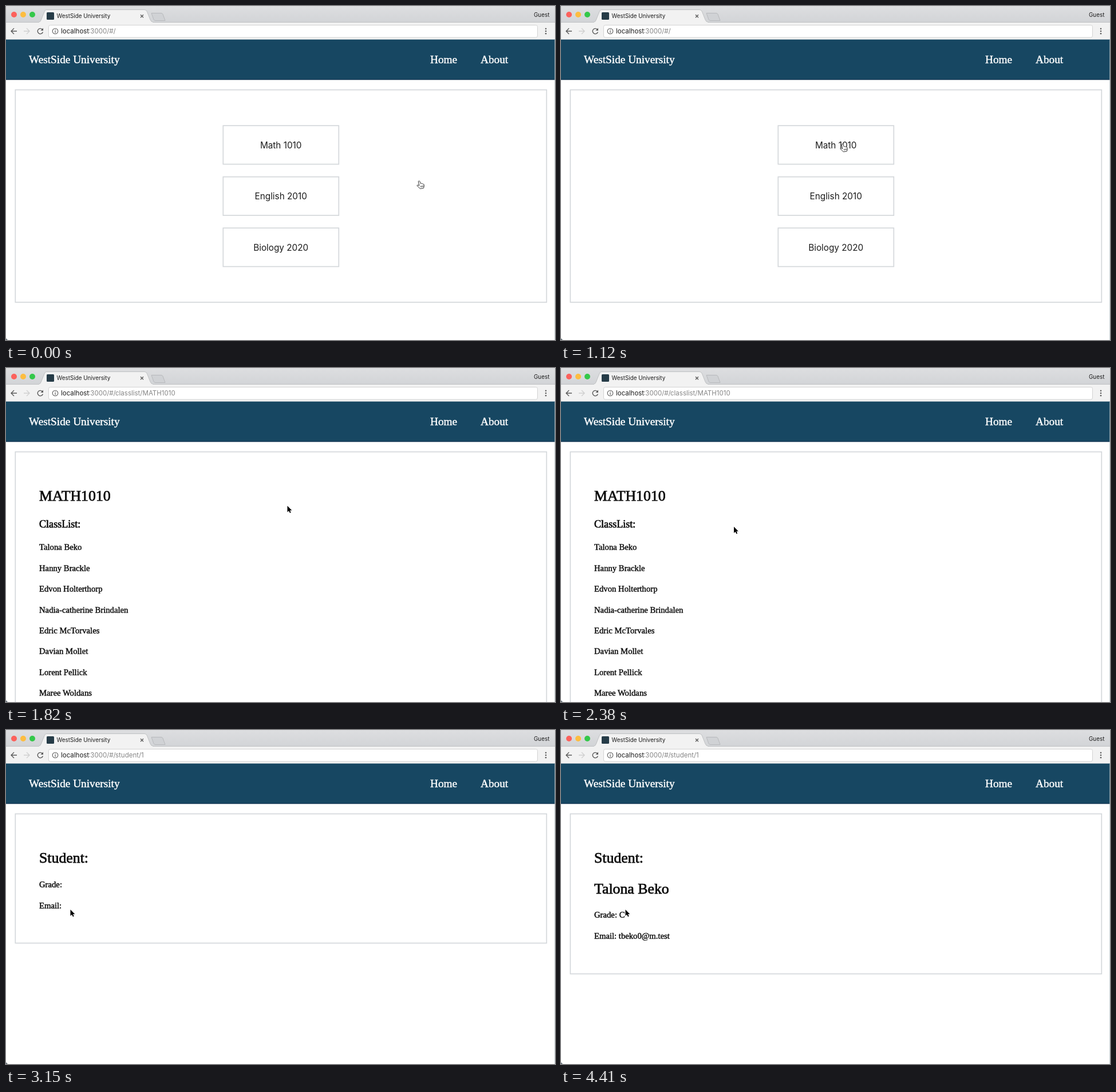
An HTML page for the animation above (4.48 s loop, 959 by 584 pixels).

```html
<!DOCTYPE html>
<html lang="en">
<head>
<meta charset="utf-8">
<title>WestSide University</title>
<style>
  html, body { margin: 0; width: 100%; height: 100%; overflow: hidden; background: #fff; }
  svg { display: block; width: 959px; height: 584px; }
  text { white-space: pre; font-family: Inter, "Liberation Sans", sans-serif; fill: #1c1c1c; }
  .serif text {
    font: 14.7px "Liberation Serif", "Times New Roman", serif;
    fill: #0c0c0c; stroke: #0c0c0c; stroke-width: .45px;
  }
  .serif .big { font-size: 25.8px; stroke-width: .75px; }
  .serif .mid { font-size: 18.1px; stroke-width: .7px; }
  .nav text { font-size: 19.3px; fill: #fff; stroke: #fff; }
  .tab { font-size: 9.9px; }
  .url { font-size: 11.5px; }
  .url .dim { fill: #858585; }
  .box { fill: none; stroke: #d4d8db; stroke-width: 1.7; }
  .course { font-size: 15.3px; text-anchor: middle; }
  .icon { fill: none; stroke: #5b5b5b; stroke-width: 1.4; }
</style>
</head>
<body>
<svg viewBox="0 0 959 584">
  <defs>
    <linearGradient id="bar" x2="0" y2="1">
      <stop stop-color="#dddee0"/><stop offset="1" stop-color="#d2d4d7"/>
    </linearGradient>
  </defs>
  <rect width="959" height="584" fill="#fff"/>

  <!-- browser window -->
  <rect width="959" height="29" fill="url(#bar)"/>
  <rect y="29" width="959" height="30" fill="#f2f2f2"/>
  <path d="M0 28.5H57Q60 28 61.500 24L67 10Q68 6.500 71 6.500H242Q245 6.500 246.500 10L252 24Q253.500 28 257 28.500H959" fill="#f2f2f2" stroke="#bfc1c3"/>
  <path d="M58 28H256V30H58Z" fill="#f2f2f2"/>
  <path d="M254 12.500H271Q273 12.500 274 14.500L278 25.500H261Q259 25.500 258 23.500Z" fill="#d0d2d5" stroke="#b7b9bc"/>
  <circle cx="14" cy="15" r="5" fill="#fc615c"/>
  <circle cx="30" cy="15" r="5" fill="#fdbd40"/>
  <circle cx="46" cy="15" r="5" fill="#34c84a"/>
  <rect x="71" y="11" width="13" height="13" rx="1.500" fill="#263c48"/>
  <text class="tab" x="88.500" y="21.300">WestSide University</text>
  <text class="tab" x="922" y="19">Guest</text>
  <path class="icon" d="M235 15.300l5 5m0-5l-5 5" stroke-width="1"/>
  <path class="icon" d="M19 44H9m5-5l-5 5 5 5"/>
  <path class="icon" d="M31 44H41m-5-5l5 5-5 5" style="stroke:#d0d0d0"/>
  <path class="icon" d="M63.500 41A4.700 4.700 0 1 0 64.400 45.500"/>
  <path d="M65 38.500V43H60.500Z" fill="#5b5b5b"/>
  <rect x="74.500" y="33.500" width="854" height="21.500" rx="3" fill="#fff" stroke="#d3d3d3"/>
  <circle class="icon" cx="86" cy="44" r="4.800" style="stroke-width:1.100"/>
  <path class="icon" d="M86 43.300V47M86 41V42.300" style="stroke-width:1.200"/>
  <g class="url">
    <text x="96" y="48">localhost</text>
    <text x="144" y="48" class="dim">:3000/#/</text>
    <text x="191" y="48" class="dim" id="path"></text>
  </g>
  <g fill="#5b5b5b">
    <circle cx="943" cy="39.700" r="1.300"/><circle cx="943" cy="44" r="1.300"/><circle cx="943" cy="48.300" r="1.300"/>
  </g>

  <!-- site header -->
  <rect y="58.600" width="959" height="70.600" fill="#174762"/>
  <path d="M0 128.600H959" stroke="#12304f"/>
  <g class="serif nav">
    <text x="40" y="100">WestSide University</text>
    <text x="741" y="100">Home</text>
    <text x="829" y="100">About</text>
  </g>

  <rect class="box" id="panel" x="16.300" y="146.600" width="928"/>
  <g id="home"></g>
  <g id="class" class="serif">
    <text class="big" x="58" y="232">MATH1010</text>
    <text class="mid" x="58" y="279">ClassList:</text>
    <g id="list"></g>
  </g>
  <g id="student" class="serif">
    <text class="big" x="58" y="232">Student:</text>
    <text class="big" x="58" y="286" id="name">Talona Beko</text>
    <text x="58" id="grade"></text>
    <text x="58" id="email"></text>
  </g>

  <path d="M958.600 59V584" stroke="#b9c4cb" stroke-width=".8"/>
  <path d="M0 580Q.5 583.500 4 584H0Z" fill="#4d5a63"/>

  <g id="cursor" stroke-linejoin="round">
    <path id="hand" d="M-1.300 1.200Q-.2-.6 1.200 .9L2.800 5Q4 4 5 5.200Q6.300 4.600 7 5.800Q8.600 5.600 8.800 7.500Q9.200 10.500 7.800 13L1.800 14Q-.5 11-3.400 9Q-4 7.200-1.800 7.600L.3 8.600ZM3 9l.5 2.500M5 8.600l.5 2.500M7 8.300l.4 2.500" fill="#fff" stroke="#333"/>
    <path id="arrow" d="M0 0V11L2.600 8.700 4.400 12.600 6.200 11.800 4.500 8H7.800Z" fill="#000" stroke="#fff" stroke-width="1.200" paint-order="stroke"/>
  </g>
</svg>
<script>
const LOOP = 4480, STEP = 70;
const OPEN_CLASS = 1190, CLASS_LOADED = 1750, OPEN_STUDENT = 3010, STUDENT_LOADED = 3570;
const $ = id => document.getElementById(id);
const show = (id, on) => $(id).style.display = on ? '' : 'none';

$('home').innerHTML = ['Math 1010', 'English 2010', 'Biology 2020'].map((label, i) => {
  const y = 209.2 + i * 89.5;
  return `<rect class="box" x="379.300" y="${y}" width="202" height="67.400"/>
    <text class="course" x="480.200" y="${y + 39.6}">${label}</text>`;
}).join('');

$('list').innerHTML = [
  'Talona Beko', 'Hanny Brackle', 'Edvon Holterthorp', 'Nadia-catherine Brindalen',
  'Edric McTorvales', 'Davian Mollet', 'Lorent Pellick', 'Maree Woldans'
].map((name, i) => `<text x="58" y="${318.3 + i * 36.4}">${name}</text>`).join('');

// Smooth move from a to b between times start and end
function glide(t, start, end, a, b) {
  const u = Math.min(1, Math.max(0, (t - start) / (end - start)));
  return a + (b - a) * u * u * (3 - 2 * u);
}

function pointer(t) {
  if (t < OPEN_CLASS) return [glide(t, 70, 996, 721.5, 491.5), glide(t, 70, 700, 305.5, 241)];
  return [glide(t, 2100, 2660, 491.5, 112.5), glide(t, 2100, 2660, 241, 314)];
}

function draw(t) {
  const home = t < OPEN_CLASS, student = t >= OPEN_STUDENT, inClass = !home && !student;
  const listed = t >= CLASS_LOADED, known = t >= STUDENT_LOADED;
  show('home', home);
  show('class', inClass);
  show('list', listed);
  show('student', student);
  show('name', known);

  const bottom = home ? 518 : inClass ? (listed ? 700 : 343.4) : known ? 426.4 : 372.6;
  $('panel').setAttribute('height', bottom - 146.6);
  $('path').textContent = home ? '' : inClass ? 'classlist/MATH1010' : 'student/1';

  $('grade').textContent = known ? 'Grade: C' : 'Grade:';
  $('grade').setAttribute('y', known ? 328 : 275);
  $('email').textContent = known ? 'Email: tbeko0@m.test' : 'Email:';
  $('email').setAttribute('y', known ? 364.5 : 311.8);

  const [x, y] = pointer(t);
  const linked = home || inClass && listed && y > 303;
  $('cursor').setAttribute('transform', `translate(${x} ${y})`);
  show('hand', linked);
  show('arrow', !linked);
}

const begin = performance.now();
function tick() {
  const t = (performance.now() - begin) % LOOP;
  draw(Math.floor(t / STEP) * STEP);
  requestAnimationFrame(tick);
}
tick();
</script>
</body>
</html>
```
